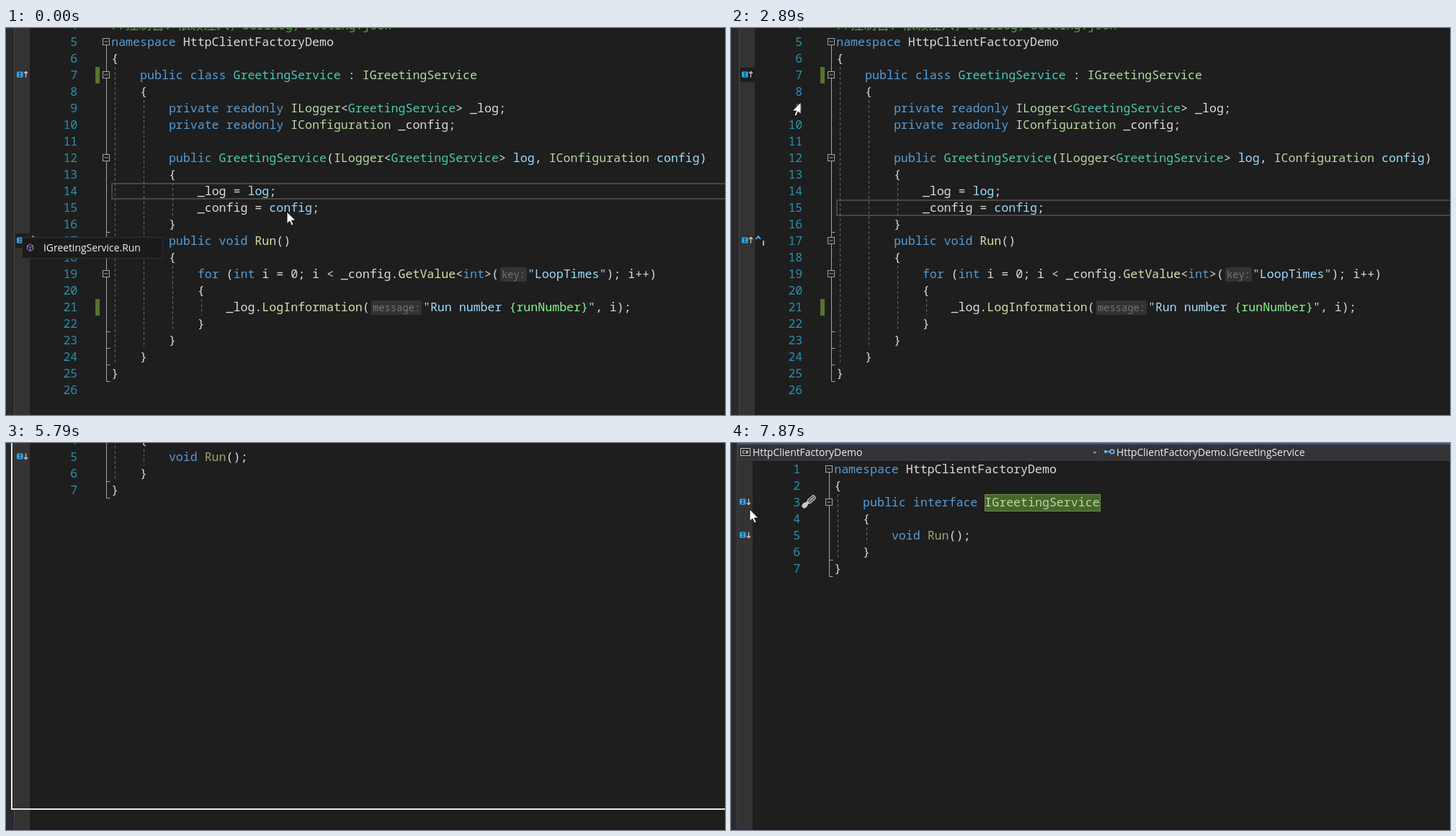
An HTML page that plays this animation: 998x537 px, repeating every 8000 ms.

```html
<!DOCTYPE html>
<html lang="en">
<head>
<meta charset="utf-8">
<title>Code navigation</title>
<style>
  html, body { margin: 0; width: 100%; height: 100%; overflow: hidden; background: #1e1e1e; }
  svg { display: block; width: 998px; height: 537px; }
  text { font: 16.6px "Noto Sans Mono", "DejaVu Sans Mono", monospace; white-space: pre; fill: #dcdcdc; }
  .ui { font: 13.9px "Open Sans", "Noto Sans", sans-serif; fill: #f1f1f1; }
  .hint { font-size: 13.8px; fill: #747474; }
  .tiny { font: bold 7px "Open Sans", sans-serif; fill: #dcdcdc; }
  .num { fill: #2b91af; text-anchor: end; }
  .k { fill: #569cd6; }
  .c { fill: #4ec9b0; }
  .i { fill: #b8d7a3; }
  .p { fill: #9cdcfe; }
  .m { fill: #dcdcaa; }
  .d { fill: #a3a377; }
  .h { fill: #86f58c; }
  .g { fill: #57a64a; }
  .z { fill: #57a64a; font: 18px "Noto Sans CJK SC", "Noto Sans CJK", sans-serif; }
  .line { fill: none; stroke: #a5a5a5; }
  .guide { fill: none; stroke: #686868; stroke-dasharray: 4 3; }
</style>
</head>
<body>
<svg id="stage" viewBox="0 0 998 537"></svg>
<script>
const LOOP = 8000, LEFT = 143.2, CHAR = 9.96;
const SCROLLED = 'translate(3 -109)';
const rowY = n => 36 + 23 * (n - 1);
const esc = s => s.replace(/&/g, '&amp;').replace(/</g, '&lt;');
const rect = (x, y, w, h, fill, more = '') =>
  `<rect x="${x}" y="${y}" width="${w}" height="${h}" fill="${fill}" ${more}/>`;
const label = (x, y, s, cls = 'ui') => `<text class="${cls}" x="${x}" y="${y}">${esc(s)}</text>`;

// Coloured code: pairs of class and text, starting at a column.
function code(n, col, ...parts) {
  let spans = '';
  for (let j = 0; j < parts.length; j += 2)
    spans += `<tspan class="${parts[j]}">${esc(parts[j + 1])}</tspan>`;
  return `<text x="${LEFT + col * CHAR}" y="${rowY(n) + 6}">${spans}</text>`;
}

const hint = (x, n, w, s) =>
  rect(x, rowY(n) - 9, w, 20, '#333', 'rx="2"') + label(x + 2, rowY(n) + 6, s, 'hint');

const numbers = count => Array.from({ length: count }, (_, j) =>
  label(96.3, rowY(j + 1) + 6, String(j + 1), 'num')).join('');

const gutter = () =>
  rect(-20, -20, 1040, 700, '#1e1e1e') + rect(-20, -20, 28, 700, '#2a2a2e') +
  rect(8, -20, 1, 700, '#434346') + rect(9, -20, 21, 700, '#333333');

// Fold line with boxes at the opening rows and ticks after the closing rows.
function outline(opens, closes) {
  const bottom = n => rowY(n) + 11.5;
  const ticks = closes.map(n => `M136.5 ${bottom(n)}h5`).join('');
  const boxes = opens.map(n => {
    const y = rowY(n);
    return rect(131.5, y - 4.5, 9, 9, '#1e1e1e', 'stroke="#a5a5a5"') +
      `<path class="line" d="M133.5 ${y}h5"/>`;
  }).join('');
  return `<path class="line" d="M136.5 ${rowY(opens[0])}V${bottom(closes[closes.length - 1])}${ticks}"/>` + boxes;
}

const guides = list => list.map(([depth, from, to]) =>
  `<path class="guide" d="M${148.5 + 40 * depth} ${rowY(from) - 11}V${rowY(to) + 11}"/>`).join('');

function marker(n, dir) {
  const y = rowY(n) - 0.5;
  return rect(12, y - 4, 8.5, 8, '#35a7e6', 'rx="1"') +
    `<path d="M14.5 ${y - 2}h3.5m-1.75 0v4m-1.75 0h3.5" stroke="#15364a" fill="none"/>` +
    `<path d="M24.5 ${y - 4}v8m-2.5 ${dir < 0 ? -5.5 : -2.5}l2.5 ${2.5 * dir}l2.5 ${-2.5 * dir}" stroke="#c8c8c8" fill="none" stroke-width="1.3"/>`;
}

const contract = (x, y) =>
  `<circle cx="${x + 2}" cy="${y}" r="2" fill="#75beff"/>` +
  `<path d="M${x + 2} ${y}h7" stroke="#75beff" stroke-width="1.4"/>` +
  `<circle cx="${x + 11}" cy="${y}" r="2.8" fill="none" stroke="#75beff" stroke-width="1.6"/>`;

const hovered = (id, n) => rect(10, rowY(n) - 10, 20, 20, '#1e1e1e', `id="${id}"`);
const changed = n => rect(121, rowY(n) - 11, 6, 23, '#577430');

const service = () => gutter() + hovered('hoverClass', 7) + hovered('hoverRun', 17) +
  changed(7) + changed(21) +
  rect(144, 0, 900, 21, 'none', 'id="current" stroke="#464646" stroke-width="2"') +
  guides([[0, 7, 24], [1, 9, 23], [2, 14, 15], [2, 19, 22], [3, 21, 21]]) +
  outline([5, 7, 12, 17, 19], [16, 22, 23, 24, 25]) + numbers(26) +
  marker(7, -1) + marker(17, -1) +
  `<path d="M31.5 ${rowY(17) - 2}l3.2 -4l3.2 4" stroke="#75beff" stroke-width="1.5" fill="none"/>` +
  rect(41, rowY(17), 2, 7, '#b0b0b0') +
  code(4, 0, 'g', '//', 'z', '控制台：依赖注入，', 'g', 'Serilog', 'z', '，', 'g', 'Setting.json') +
  code(5, 0, 'k', 'namespace', '', ' HttpClientFactoryDemo') +
  code(6, 0, '', '{') +
  code(7, 4, 'k', 'public class ', 'c', 'GreetingService', '', ' : ', 'i', 'IGreetingService') +
  code(8, 4, '', '{') +
  code(9, 8, 'k', 'private readonly ', 'i', 'ILogger', '', '<', 'c', 'GreetingService', '', '> _log;') +
  code(10, 8, 'k', 'private readonly ', 'i', 'IConfiguration', '', ' _config;') +
  code(12, 8, 'k', 'public ', 'c', 'GreetingService', '', '(', 'i', 'ILogger', '', '<', 'c', 'GreetingService',
    '', '> ', 'p', 'log', '', ', ', 'i', 'IConfiguration', 'p', ' config', '', ')') +
  code(13, 8, '', '{') +
  code(14, 12, '', '_log = ', 'p', 'log', '', ';') +
  code(15, 12, '', '_config = ', 'p', 'config', '', ';') +
  code(16, 8, '', '}') +
  code(17, 8, 'k', 'public void ', 'm', 'Run', '', '()') +
  code(18, 8, '', '{') +
  code(19, 12, 'k', 'for', '', ' (', 'k', 'int', '', ' i = 0; i < _config.', 'm', 'GetValue', '', '<', 'k', 'int', '', '>(') +
  hint(683, 19, 37, 'key:') +
  code(19, 58, 'p', '"LoopTimes"', '', '); i++)') +
  code(20, 12, '', '{') +
  code(21, 16, '', '_log.', 'm', 'LogInformation', '', '(') +
  hint(504, 21, 70, 'message:') +
  code(21, 43.45, 'p', '"Run number ', 'h', '{runNumber}', 'p', '"', '', ', i);') +
  code(22, 12, '', '}') + code(23, 8, '', '}') + code(24, 4, '', '}') + code(25, 0, '', '}');

const navBar = () =>
  rect(9, 0, 1000, 25, '#2d2d30') + rect(9, 0, 1000, 1.5, '#007acc') +
  rect(9.5, 2.5, 502, 21, '#333337', 'stroke="#3f3f46"') +
  rect(514.5, 2.5, 500, 21, '#333337', 'stroke="#3f3f46"') +
  rect(13.5, 7.5, 13, 10, '#252526', 'stroke="#c8c8c8"') + label(15.5, 15.3, 'C#', 'tiny') +
  label(30, 18, 'HttpClientFactoryDemo') +
  '<path d="M502 12h6l-3 3z" fill="#999"/>' +
  contract(518, 12) + label(535, 18, 'HttpClientFactoryDemo.IGreetingService');

const screwdriver = () =>
  `<g transform="translate(108 81.500) rotate(-42)" stroke="#d0d0d0" fill="#5a5a5a">
    <rect x="-1" y="-3" width="12" height="6" rx="2"/><path d="M1 0h8"/>
    <path d="M-11 -2l4 -1l6 2v2l-6 2l-4 -1z" fill="#c8c8c8"/></g>`;

const contractDoc = () => gutter() + guides([[0, 3, 6], [1, 5, 5]]) +
  outline([1, 3], [6, 7]) + numbers(7) + marker(3, 1) + marker(5, 1) + screwdriver() +
  rect(352.5, 71.5, 160, 23, '#48652c', 'stroke="#6e8f50"') +
  code(1, 0, 'k', 'namespace', '', ' HttpClientFactoryDemo') +
  code(2, 0, '', '{') +
  code(3, 4, 'k', 'public interface ', 'i', 'IGreetingService') +
  code(4, 4, '', '{') +
  code(5, 8, 'k', 'void ', 'd', 'Run', '', '();') +
  code(6, 4, '', '}') + code(7, 0, '', '}') + navBar();

const popup = (id, x, y, w, h, inner) =>
  `<g id="${id}">${rect(x + .5, y + .5, w - 1, h - 1, '#1b1b1c', 'stroke="#333337"')}${inner}</g>`;

const ARROW = 'M0 0V16.500L3.800 13L6.500 19L9 18L6.400 12H11.800Z';

document.getElementById('stage').innerHTML =
  `<g id="service" transform="${SCROLLED}">${service()}</g><g id="contract">${contractDoc()}</g>` +
  popup('runPopup', 22, 290, 196, 30,
    '<path d="M33.500 300l4 2.200v5l-4 2.300l-4 -2.300v-5zm-4 2.200l4 2.200l4 -2.200m-4 2.200v5" fill="none" stroke="#b180d7"/>' +
    label(52, 310, 'IGreetingService.Run')) +
  popup('classPopup', 18, 63, 168, 30, contract(26, 78) + label(49, 83, 'IGreetingService')) +
  '<path id="frame" fill="none" stroke="#e8e8e8" stroke-width="2"/>' +
  `<g id="cursor"><path id="arrow" d="${ARROW}" fill="#fff" stroke="#000" stroke-width=".8"/>
   <path id="beam" d="M-3.500 -7.500h3m1 0h3M-3.500 7.500h3m1 0h3M0 -7.500v15" fill="none" stroke="#e6e6e6" stroke-width="1.2"/></g>`;

// time, x, y, shape: a = arrow, r = arrow pointing right, b = text beam, empty = outside
const cursorSteps = [
  [0, 390, 255, 'a'], [250, 362, 238, 'b'], [380, 285, 200, 'b'], [510, 190, 150, 'b'],
  [640, 98, 105, 'r'], [770, 45, 80, 'r'], [900, 24, 70, 'a'], [1030, 18, 67, 'a'],
  [1190, 17, 63, 'a'], [1920, 22, 68, 'a'], [2060, 45, 77, 'a'], [2200, 74, 92, 'a'],
  [2340, 98, 140, 'r'], [2480, 104, 181, 'r'], [2620, 103, 160, 'r'], [2750, 100, 125, 'r'],
  [2890, 97, 103, 'r'], [3010, 115, 110, 'r'], [3150, 175, 135, 'b'], [3280, 245, 168, 'b'],
  [3410, 296, 191, 'b'], [3550, 315, 199, 'b'], [4760, 335, 170, 'b'], [4910, 390, 110, 'b'],
  [5060, 450, 40, 'b'], [5200, 0, 0, ''], [6720, 225, 245, 'b'], [6870, 198, 216.5, 'b'],
  [7020, 166, 170, 'b'], [7160, 115, 112, 'r'], [7300, 62, 80, 'r'], [7440, 30, 71, 'a'],
  [7580, 27, 78, 'a'], [7720, 25, 87, 'a'], [7870, 26, 92, 'a']
];
// time, x, y of the bottom left corner of the recording frame
const frameSteps = [
  [0, -9, 600], [5500, 8, 508], [5940, 4, 496], [6070, -4, 474],
  [6180, -9, 458], [6300, -9, 430], [6430, -4, 408], [6560, -9, 600]
];

const at = (steps, t) => steps.filter(s => s[0] <= t).pop();
const el = Object.fromEntries([...document.querySelectorAll('[id]')].map(e => [e.id, e]));
const show = (e, on) => e.setAttribute('visibility', on ? 'visible' : 'hidden');
const within = (t, from, to) => t >= from && t < to;

function draw(t) {
  const swapped = t >= 3150;
  el.service.style.display = swapped ? 'none' : '';
  el.contract.style.display = swapped ? '' : 'none';
  el.contract.setAttribute('transform', t < 6560 ? SCROLLED : '');
  el.current.setAttribute('y', rowY(t < 120 ? 14 : 15) - 10);
  show(el.hoverRun, t < 120);
  show(el.hoverClass, within(t, 1030, 3150));
  show(el.runPopup, t < 120);
  show(el.classPopup, within(t, 1500, 2340));

  const [, fx, fy] = at(frameSteps, t);
  el.frame.setAttribute('d', `M${fx} -5V${fy}H1010`);

  const [, x, y, shape] = at(cursorSteps, t);
  el.cursor.setAttribute('transform', `translate(${x} ${y}) scale(${shape === 'r' ? -1 : 1} 1)`);
  show(el.arrow, shape === 'a' || shape === 'r');
  show(el.beam, shape === 'b');
}

const start = performance.now();
function tick() {
  draw((performance.now() - start) % LOOP);
  requestAnimationFrame(tick);
}
tick();
</script>
</body>
</html>
```
